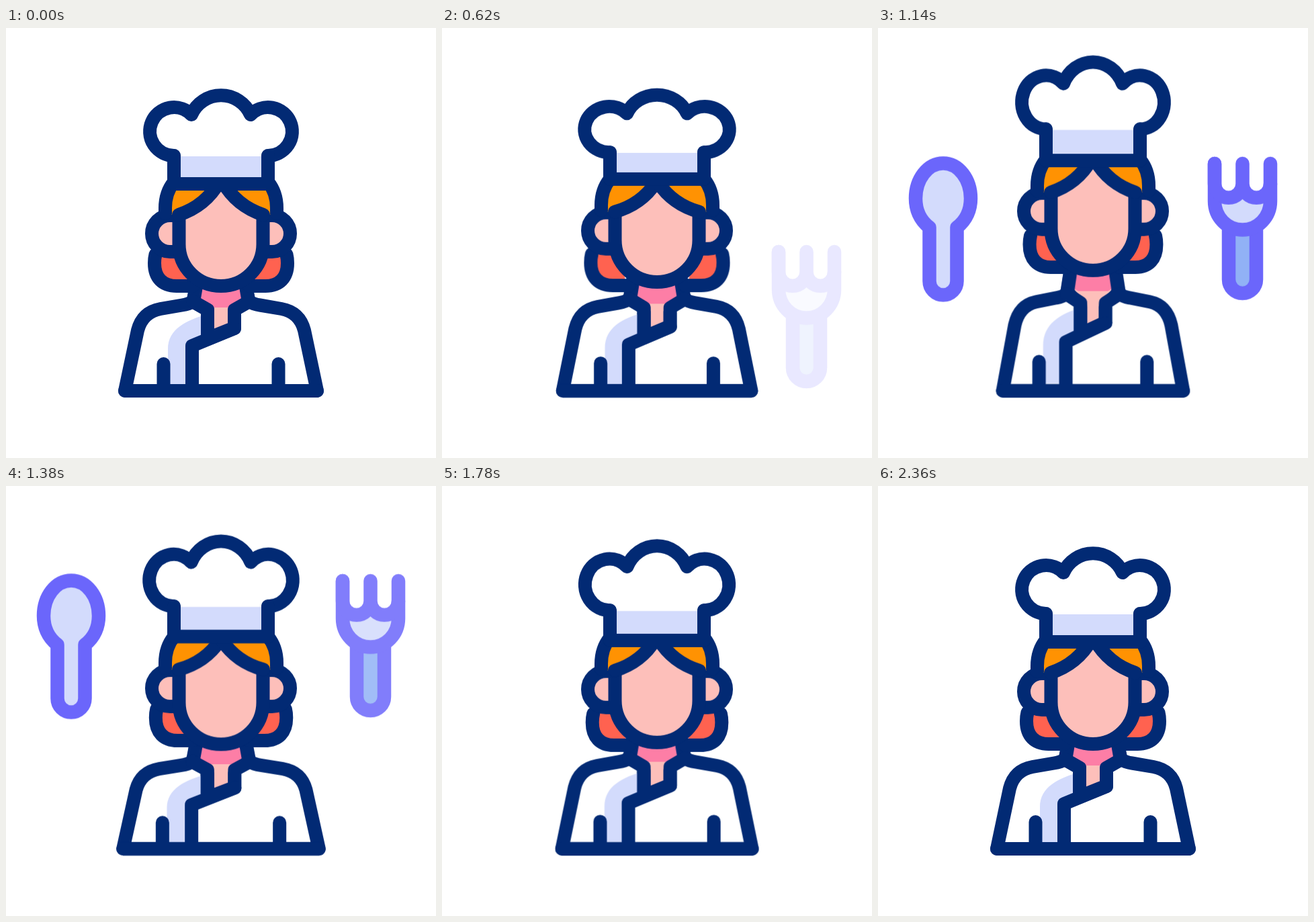
These frames come from a looping animation (640x640 px, 2620 ms). An HTML page without scripts:

```html
<!DOCTYPE html>
<html lang="en">
<head>
<meta charset="utf-8">
<title>Chef</title>
<style>
:root {
  --io: cubic-bezier(.333, 0, .667, 1);
  --in: cubic-bezier(.333, 0, .667, .5);
  --out: cubic-bezier(.333, .5, .667, 1);
}
html, body { margin: 0; width: 100%; height: 100%; overflow: hidden; background: #fff; }
svg { display: block; width: 100%; height: 100%; }

path { vector-effect: non-scaling-stroke; }
.line { stroke: #022a74; stroke-width: 20; stroke-linecap: round; stroke-linejoin: round; fill: none; }
.tool { stroke: #6b66fb; stroke-width: 20.5; stroke-linecap: round; stroke-linejoin: round; fill: none; }
.white { fill: #fff; }
.skin { fill: #fdbfba; }
.light { fill: #d3dbfc; }
.red { fill: #ff6250; }
.orange { fill: #ff9202; }
.flat { stroke: none; }

.move { animation: 2620ms var(--io) infinite; }
.body { animation-name: body; transform-origin: 320px 540px; }
.shade { animation-name: shade; }
.locks { animation-name: locks; transform-origin: 320px 0; }
.hair { animation-name: hair; }
.face { animation-name: face; }
.fringe { animation-name: fringe; transform-origin: 320px 278px; }
.hat { animation-name: hat; }
.puff { animation-name: puff; transform-origin: 320px 232px; }
.lobes { animation-name: lobes; }
.rise { animation-name: rise; animation-timing-function: linear; }
.spoon { animation-name: spoon; animation-timing-function: linear; }
.fork { animation-name: fork; animation-timing-function: linear; }

@keyframes body {
  0%, 7.63% { transform: scale(1); }
  15.27% { transform: scale(1.075, .895); animation-timing-function: var(--in); }
  30.53% { transform: scale(.965, 1.05); animation-timing-function: var(--out); }
  41.98% { transform: scale(.936, 1.09); }
  57.25% { transform: scale(1.042, .945); }
  70.23% { transform: scale(.985, 1.02); }
  90.08%, 100% { transform: scale(1); }
}
@keyframes shade {
  0%, 7.63% { transform: translateY(0); }
  16.79% { transform: translateY(21px); animation-timing-function: var(--in); }
  30.53% { transform: translateY(-12px); animation-timing-function: var(--out); }
  45.04% { transform: translateY(-24.5px); }
  58.78% { transform: translateY(14px); }
  71% { transform: translateY(-9px); }
  90.08%, 100% { transform: translateY(0); }
}
@keyframes locks {
  0%, 7.63% { transform: translateY(0) scaleX(1); }
  17.56% { transform: translateY(20.7px) scaleX(1); animation-timing-function: var(--in); }
  30.53% { transform: translateY(-7px) scaleX(.995); animation-timing-function: var(--out); }
  46.95% { transform: translateY(-28.5px) scaleX(.953); }
  60.69% { transform: translateY(33px) scaleX(1.03); }
  72.52% { transform: translateY(-13.5px) scaleX(.945); }
  90.08%, 100% { transform: translateY(0) scaleX(1); }
}
@keyframes hair {
  0%, 7.63% { transform: translateY(0); }
  17.18% { transform: translateY(24.7px); animation-timing-function: var(--in); }
  30.53% { transform: translateY(-12px); animation-timing-function: var(--out); }
  46.56% { transform: translateY(-33.8px); }
  60.31% { transform: translateY(35px); }
  71.76% { transform: translateY(-16.5px); }
  90.08%, 100% { transform: translateY(0); }
}
@keyframes face {
  0%, 7.63% { transform: translateY(0); }
  16.79% { transform: translateY(19px); animation-timing-function: var(--in); }
  30.53% { transform: translateY(-12px); animation-timing-function: var(--out); }
  45.04% { transform: translateY(-23.3px); }
  59.54% { transform: translateY(20.3px); }
  71% { transform: translateY(-7px); }
  90.08%, 100% { transform: translateY(0); }
}
@keyframes fringe {
  0%, 7.63% { transform: scaleY(1); }
  17.18% { transform: scaleY(.89); }
  30.53% { transform: scaleY(.85); }
  43.51%, 47.7% { transform: scaleY(1); }
  60.31% { transform: scaleY(.6); }
  71.76% { transform: scaleY(1.06); }
  90.08%, 100% { transform: scaleY(1); }
}
@keyframes hat {
  0%, 7.63% { transform: translateY(0); }
  17.18% { transform: translateY(22.3px); animation-timing-function: var(--in); }
  30.53% { transform: translateY(-15px); animation-timing-function: var(--out); }
  46.56% { transform: translateY(-35.2px); }
  60.31% { transform: translateY(29.5px); }
  71.76% { transform: translateY(-13px); }
  90.08%, 100% { transform: translateY(0); }
}
@keyframes puff {
  0%, 17% { transform: scaleY(1); }
  30% { transform: scaleY(.9); animation-timing-function: var(--in); }
  36.64% { transform: scaleY(1.01); animation-timing-function: var(--out); }
  48.09% { transform: scaleY(1.125); }
  60.9% { transform: scaleY(.955); }
  73.28% { transform: scaleY(1.138); }
  90.08%, 100% { transform: scaleY(1); }
}
@keyframes lobes {
  0%, 17%, 43.51%, 49%, 72.5%, 100% {
    d: path("M250 232V190A36 36 0 1 1 276 129A48 48 0 0 1 364 129A36 36 0 1 1 390 190V232Z");
  }
  30.5%, 60.7% {
    d: path("M250 232V190A37.2 36 0 1 1 274.3 129A49.5 48 0 0 1 365.7 129A37.2 36 0 1 1 390 190V232Z");
  }
}
@keyframes rise {
  0%, 21.37% { transform: translateY(146.5px); }
  62.6%, 100% { transform: translateY(-126.2px); }
}
@keyframes spoon {
  0%, 26.72% { opacity: 0; }
  32.06%, 55.73% { opacity: 1; }
  60.6%, 100% { opacity: 0; }
}
@keyframes fork {
  0%, 22.9% { opacity: 0; }
  28.24%, 51.9% { opacity: 1; }
  57.25%, 100% { opacity: 0; }
}
</style>
</head>
<body>
<svg viewBox="0 0 640 640" role="img" aria-label="Chef with spoon and fork">
  <defs>
    <g id="lock">
      <path class="red flat" d="M222 336Q221 343 221 350C221 372 233 384 254 384H272V333Z"/>
      <path d="M222.500 337Q221 343 221 350C221 372 233 384 254 384H278"/>
    </g>
    <path id="ear" class="skin" d="M257 279H244A27 27 0 0 0 244 333H257"/>
    <path id="dome" d="M237 276V268C237 253 241 240 250 229"/>
    <path id="fill" class="orange flat" d="M326 190V212L318 228Q297 265 257 278H243V190Z"/>
    <path id="bang" d="M326 212L318 228Q297 265 257 278"/>
  </defs>

  <g class="move rise">
    <g class="move spoon tool">
      <path class="light" d="M76.5 377V297C62 286 56 270 56 254C56 225 74 201.5 97 201.5S138 225 138 254C138 270 132 286 117.5 297V377A20.5 20.5 0 0 1 76.5 377Z"/>
    </g>
    <g class="move fork tool">
      <path fill="#91b1f6" d="M522 296V374.500A20.500 20.500 0 0 0 563 374.500V296"/>
      <path class="light flat" d="M501 245H584V258A41.500 42.500 0 0 1 501 258Z"/>
      <path d="M501 202V258A41.500 42.500 0 0 0 584 258V202"/>
      <path d="M501 202V232A20.700 20.700 0 0 0 542.500 232V202M542.500 232A20.700 20.700 0 0 0 584 232"/>
    </g>
  </g>

  <g class="line">
    <g class="move body">
      <path class="skin" d="M288 355L279 404L300 425V462L340 446V425L361 404L352 355"/>
    </g>
    <path class="move shade flat" fill="#fd7ea6" d="M290 340L279 405L298 416H342L361 405L350 340Z"/>
    <g class="move body">
      <path d="M288 355L280 402M352 355L360 402"/>
      <path class="white" d="M177 540L196 450Q203 423 230 418L262 412.500Q272 411 278 407L300 419.500V463L340 447V419.500L362 407Q368 411 378 412.500L410 418Q437 423 444 450L463 540Z"/>
      <path class="light flat" d="M300 426C268 435 241 448 241 478V530H277V472L300 462Z"/>
      <path d="M278 407L300 419.500V463M340 447L277 473V540M177 540H463M234.500 500V540M405.500 500V540"/>
    </g>

    <g class="move locks">
      <use href="#lock"/>
      <use href="#lock" transform="matrix(-1 0 0 1 640 0)"/>
    </g>
    <g class="move hair">
      <use href="#ear"/>
      <use href="#ear" transform="matrix(-1 0 0 1 640 0)"/>
    </g>
    <g class="move face">
      <path class="skin" d="M257.500 262V322A62.500 62 0 0 0 382.500 322V262"/>
    </g>
    <g class="move hair">
      <path class="skin flat" d="M270 215H370V282H270Z"/>
      <g class="move fringe">
        <use href="#fill"/>
        <use href="#fill" transform="matrix(-1 0 0 1 640 0)"/>
        <use href="#bang"/>
        <use href="#bang" transform="matrix(-1 0 0 1 640 0)"/>
      </g>
      <use href="#dome"/>
      <use href="#dome" transform="matrix(-1 0 0 1 640 0)"/>
    </g>

    <g class="move hat">
      <g class="move puff">
        <path class="move lobes white" d="M250 232V190A36 36 0 1 1 276 129A48 48 0 0 1 364 129A36 36 0 1 1 390 190V232Z"/>
        <path class="light flat" d="M260 191H380V223H260Z"/>
        <path d="M250 190V232H390V190"/>
      </g>
    </g>
  </g>
</svg>
</body>
</html>
```
